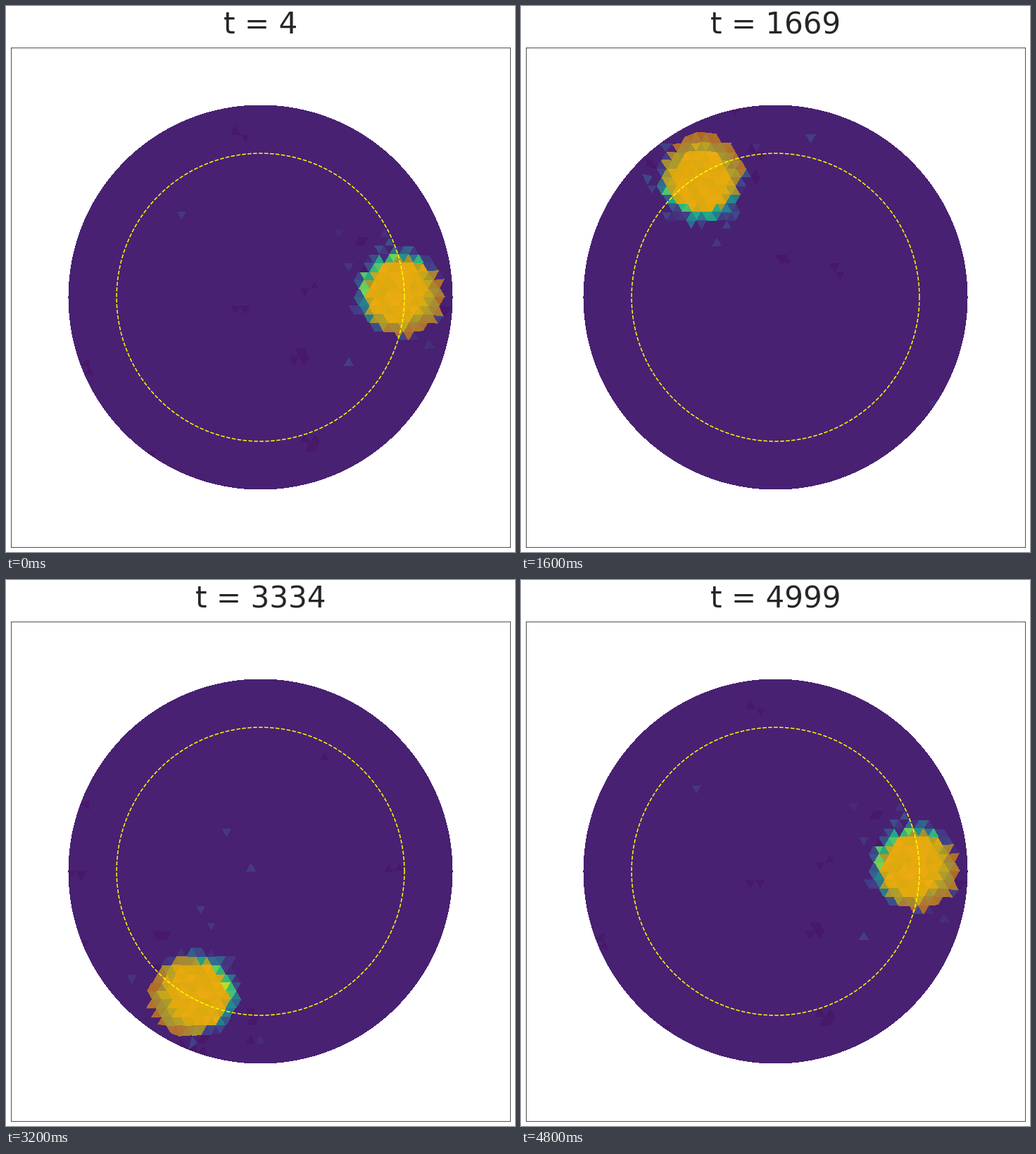
A matplotlib script that plays this animation: 723x775 px, repeating every 5 s.

```python
import numpy as np
import matplotlib.pyplot as plt
from matplotlib.animation import FuncAnimation
from matplotlib.collections import PolyCollection
from matplotlib.tri import Triangulation

WIDTH, HEIGHT, DPI = 723, 775, 72
PAD, SIDE = 7.2, 708.6
FRAMES, INTERVAL = 25, 200
FIRST, LAST = 4, 4999

# Lengths in disk radii.
ORBIT, SPOT, SPACING = 0.75, 0.2, 0.0514
LAG = 0.03
FIELD_EDGE, FIELD_SLOPE = 0.228, 0.088
REST, DIM = 0.092, 0.064
OVERLAY, ALPHA = np.array([226, 142, 8]) / 255, 0.68


def distance(points, origin=(0, 0)):
    return np.hypot(*(points - np.asarray(origin)).T)


def circle(radius, angle):
    return radius * np.column_stack([np.cos(angle), np.sin(angle)])


def build_mesh():
    """Equilateral lattice, relaxed towards the rim of the disk."""
    rows, cols = np.mgrid[-24:25, -22:23]
    x = SPACING * (cols + 0.5 + 0.5 * (rows % 2))
    y = SPACING * np.sqrt(3) / 2 * rows
    inner = np.column_stack([x.ravel(), y.ravel()])
    inner = inner[distance(inner) < 1 - 0.6 * SPACING]
    rim = circle(1, np.linspace(0, 2 * np.pi, 122, endpoint=False))
    points = np.vstack([inner, rim])
    free = np.clip((distance(points) - 0.65) / 0.25, 0, 1)[:, None]
    free[len(inner):] = 0
    for _ in range(8):
        edges = Triangulation(*points.T).edges
        total, count = np.zeros_like(points), np.zeros((len(points), 1))
        for a, b in (edges.T, edges.T[::-1]):
            np.add.at(total, a, points[b])
            np.add.at(count, a, 1)
        points = points + 0.6 * free * (total / count - points)
    return points, Triangulation(*points.T).triangles


points, triangles = build_mesh()
cells = points[triangles]
centroids = cells.mean(axis=1)


def falloff(d, reach):
    return np.exp(-np.maximum(d - FIELD_EDGE, 0) / reach)


def cell_colors(step):
    step %= FRAMES - 1
    rng = np.random.default_rng(40 + step)
    theta = 2 * np.pi * step / (FRAMES - 1)
    outward = np.array([np.cos(theta), np.sin(theta)])
    forward = np.array([-np.sin(theta), np.cos(theta)])
    spot = ORBIT * outward
    field = spot + LAG * (forward - outward)

    # The inner field sits ahead of the spot and frays at its edge.
    d = distance(centroids, field)
    rise = np.clip((FIELD_EDGE - d) / FIELD_SLOPE, 0, 1)
    value = REST + (1 - REST) * rise
    value += rng.normal(0, 0.6, len(d)) * rise * (1 - rise)
    value -= 0.08 * rng.random(len(d)) * (rise == 1)

    # Dim clumps share a vertex; pale cells are single and hug the edge.
    outside = rise == 0
    chance = 0.002 + 0.05 * falloff(distance(points, field), 0.16)
    clump = (rng.random(len(points)) < chance)[triangles].any(axis=1)
    value[outside & clump & (rng.random(len(d)) < 0.4)] = DIM
    near = falloff(d, 0.03)
    pale = outside & (rng.random(len(d)) < 0.0015 + 0.25 * near)
    value[pale] = rng.uniform(0.12, 0.2 + 0.15 * near[pale])

    rgb = plt.cm.viridis(np.clip(value, DIM, 1))[:, :3]
    covered = distance(centroids, spot) < SPOT
    rgb[covered] = (1 - ALPHA) * rgb[covered] + ALPHA * OVERLAY
    return rgb


fig = plt.figure(figsize=(WIDTH / DPI, HEIGHT / DPI), dpi=DPI, facecolor="white")
ax = fig.add_axes([PAD / WIDTH, PAD / HEIGHT, SIDE / WIDTH, SIDE / HEIGHT])
ax.set(xlim=(-1.3, 1.3), ylim=(-1.3, 1.3), xticks=[], yticks=[])
for spine in ax.spines.values():
    spine.set(color="#262626", linewidth=0.8)

mesh = PolyCollection(cells, edgecolors="none", linewidths=0, antialiased=False)
ax.add_collection(mesh, autolim=False)
ax.plot(*circle(ORBIT, np.linspace(0, 2 * np.pi, 400)).T,
        "--", color="yellow", lw=1.5)
title = ax.set_title("", fontsize=42, pad=20, color="#262626",
                     family="DejaVu Sans")


def update(step):
    mesh.set_facecolor(cell_colors(step))
    title.set_text(f"t = {int(FIRST + (LAST - FIRST) * step / (FRAMES - 1))}")
    return mesh, title


anim = FuncAnimation(fig, update, frames=FRAMES, interval=INTERVAL,
                     repeat=True, repeat_delay=0)
plt.show()
```
